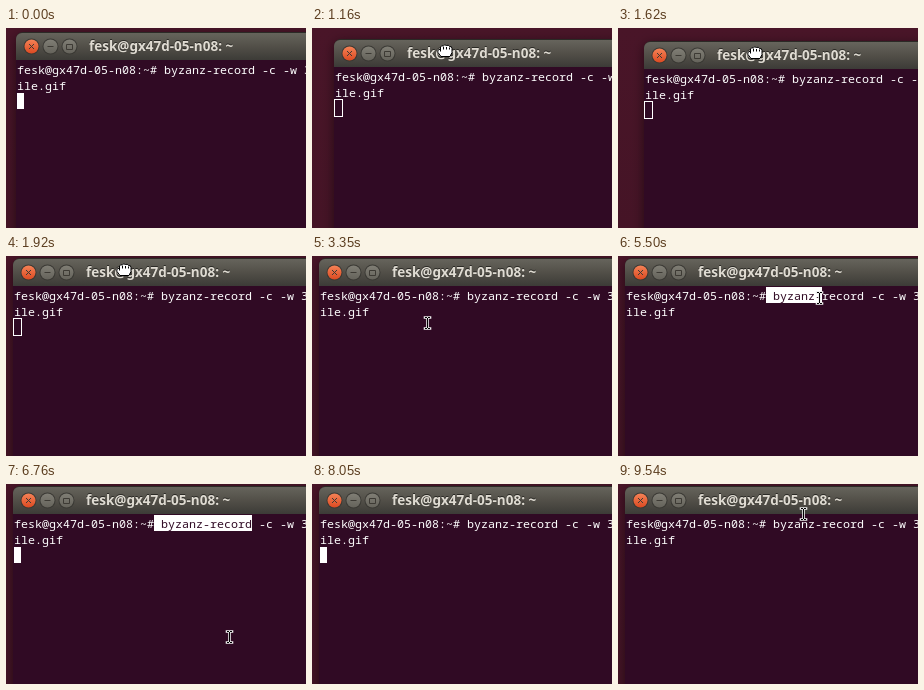
Animation of 300 by 200 pixels, one loop 9570 ms. Source, as an HTML page with a canvas:

```html
<!DOCTYPE html>
<html lang="en">
<head>
<meta charset="utf-8">
<title>Terminal window drag and select</title>
<style>
  html, body { margin: 0; width: 100%; height: 100%; overflow: hidden; background: #451426; }
  canvas { display: block; width: 300px; height: 200px; }
</style>
</head>
<body>
<canvas id="stage" width="300" height="200"></canvas>
<script>
const ctx = document.getElementById('stage').getContext('2d');
const LOOP = 9570, CELL_W = 7, CELL_H = 16;
const PURPLE = '#300a24', WHITE = '#fff', EDGE = '#2b2a26';
const HOST = 'fesk@gx47d-05-n08';
const LINES = [HOST + ':~# byzanz-record -c -w 300', 'ile.gif'];
const SELECT_X = 148, SELECT_MAX = 14;
const ENTER = 310, DRAG = 970, DROP = 1920, RELEASE = 2540;
const SELECT = 5240, DESELECT = 6780;

// Each move runs from the previous end to (x, y), bowed sideways by half a sine
const move = (start, end, x, y, bowX = 0, bowY = 0) => ({ start, end, x, y, bowX, bowY });
const MOVES = [
  move(ENTER, 780, 120, 12),
  move(DRAG, DROP, 117, 10, 21.5, 13),
  move(RELEASE, 2830, 122, 60, 6),
  move(3270, 4210, 44, 58, 0, 28),
  move(4260, 4350, 47, 42),
  move(4350, 5190, 149, 42, 55),
  move(SELECT, 5760, 247, 42, 3),
  move(6110, 6280, 223, 153),
  move(6980, 7220, 222, 212),
  move(9320, 9540, 185, 30)
];

function pointerAt(t) {
  let x = 154, y = 196;
  for (const m of MOVES) {
    if (t <= m.start) break;
    const k = Math.min(1, (t - m.start) / (m.end - m.start));
    const bow = Math.sin(Math.PI * k);
    x += (m.x - x) * k + m.bowX * bow;
    y += (m.y - y) * k + m.bowY * bow;
  }
  return { x: Math.round(x), y: Math.round(y) };
}

function windowOffset(t, pointer) {
  if (t < DRAG) return [3, 2];
  return t < DROP ? [pointer.x - 117, pointer.y - 10] : [0, 0];
}

function caretAt(t) {
  if (t >= 780 && t < RELEASE) return 'hollow';
  if (t < 3350) return 'block';
  return Math.floor((t - 3350) / 940) % 2 ? 'block' : 'off';
}

function selectedCells(t, pointer) {
  if (t < SELECT || t >= DESELECT) return 0;
  if (t >= 5760) return SELECT_MAX;
  return Math.min(SELECT_MAX, Math.round((pointer.x - SELECT_X) / CELL_W));
}

function verticalFade(y0, y1, ...colors) {
  const fade = ctx.createLinearGradient(0, y0, 0, y1);
  colors.forEach((c, i) => fade.addColorStop(i / (colors.length - 1), c));
  return fade;
}

function disc(x, y, r, fill) {
  ctx.fillStyle = fill;
  ctx.beginPath();
  ctx.arc(x, y, r, 0, Math.PI * 2);
  ctx.fill();
}

function drawButton(index, icon, top, bottom) {
  const x = 22.5 + index * 19, y = 16.5;
  disc(x, y, 8, '#3a3934');
  disc(x, y, 7, verticalFade(y - 7, y + 7, top, bottom));
  ctx.strokeStyle = '#3d3a34';
  ctx.lineWidth = 1;
  ctx.stroke(new Path2D(`M${x} ${y}${icon}`));
}

function topRounded(y, height, radius, fill) {
  ctx.fillStyle = fill;
  ctx.beginPath();
  ctx.roundRect(7, y, 420, height, [radius, radius, 0, 0]);
  ctx.fill();
}

function drawFrame() {
  ctx.save();
  ctx.shadowColor = 'rgba(0,0,0,.5)';
  ctx.shadowBlur = 12;
  ctx.shadowOffsetY = 3;
  topRounded(2, 320, 7, EDGE);
  ctx.restore();
  topRounded(3, 27, 6, verticalFade(3, 30, '#66645c', '#524f48', '#3c3b37'));
  ctx.fillStyle = PURPLE;
  ctx.fillRect(7, 30, 420, 290);

  drawButton(0, 'm-2.5-2.5l5 5m0-5l-5 5', '#f58256', '#dc4a22');
  drawButton(1, 'm-3 0h6', '#807e75', '#65635b');
  drawButton(2, 'm-3-2h6v5h-6z', '#807e75', '#65635b');

  ctx.font = 'bold 13.5px "Noto Sans", sans-serif';
  ctx.fillStyle = EDGE;
  ctx.fillText(HOST + ': ~', 80, 20);
  ctx.fillStyle = '#dfdbd2';
  ctx.fillText(HOST + ': ~', 80, 21);
}

function drawTerminal(selected, caret) {
  ctx.fillStyle = WHITE;
  ctx.fillRect(SELECT_X, 31, selected * CELL_W, CELL_H);
  ctx.font = '500 11.67px "Noto Sans Mono", monospace';
  LINES.forEach((line, row) => [...line].forEach((char, col) => {
    const x = 8 + col * CELL_W;
    const inverse = row === 0 && x >= SELECT_X && x < SELECT_X + selected * CELL_W;
    ctx.fillStyle = inverse ? PURPLE : WHITE;
    ctx.fillText(char, x, 44 + row * CELL_H);
  }));
  if (caret === 'block') {
    ctx.fillStyle = WHITE;
    ctx.fillRect(8, 63, CELL_W, CELL_H);
  } else if (caret === 'hollow') {
    ctx.strokeStyle = WHITE;
    ctx.lineWidth = 1;
    ctx.strokeRect(7.5, 62.5, CELL_W + 1, CELL_H + 1);
  }
}

const BEAM = new Path2D('M-2-5.5H0M1-5.5H3M.5-5V5M-2 5.5H0M1 5.5H3');
const ARROW = new Path2D('M0 0V14L3.3 11L5.5 16L8 15L5.8 10H10Z');
const FIST = new Path2D('M-3 9.5L-6 5.5Q-7 2-3.5 2.5V0Q-2.5-2-.5-1Q.5-3 2.5-1.5Q4.5-2.5 5.5-.5Q8-1 8 1.5V5.5L6 9.5Z');
const KNUCKLES = new Path2D('M-.5 0V2.5M2.5 0V2.5M5.5 .5V2.5M-3.5 2V4.5');

function stroke(path, color, width) {
  ctx.strokeStyle = color;
  ctx.lineWidth = width;
  ctx.stroke(path);
}

function drawOutlined(shape) {
  ctx.fillStyle = WHITE;
  ctx.fill(shape);
  stroke(shape, '#000', 1);
}

function drawPointer(t, { x, y }) {
  ctx.save();
  ctx.translate(x, y);
  ctx.lineJoin = 'round';
  if (t >= DRAG && t < RELEASE + 20) {
    drawOutlined(FIST);
    stroke(KNUCKLES, '#000', 1);
  } else if (y < 30) {
    drawOutlined(ARROW);
  } else {
    ctx.lineCap = 'square';
    stroke(BEAM, '#eee', 2.6);
    ctx.lineCap = 'butt';
    stroke(BEAM, '#000', 1);
  }
  ctx.restore();
}

function draw(t) {
  const pointer = pointerAt(t);
  ctx.fillStyle = verticalFade(0, 200, '#491528', '#451426');
  ctx.fillRect(0, 0, 300, 200);
  ctx.save();
  ctx.translate(...windowOffset(t, pointer));
  drawFrame();
  drawTerminal(selectedCells(t, pointer), caretAt(t));
  ctx.restore();
  if (t >= ENTER) drawPointer(t, pointer);
}

const start = performance.now();
function tick() {
  draw((performance.now() - start) % LOOP);
  requestAnimationFrame(tick);
}
tick();
</script>
</body>
</html>
```
